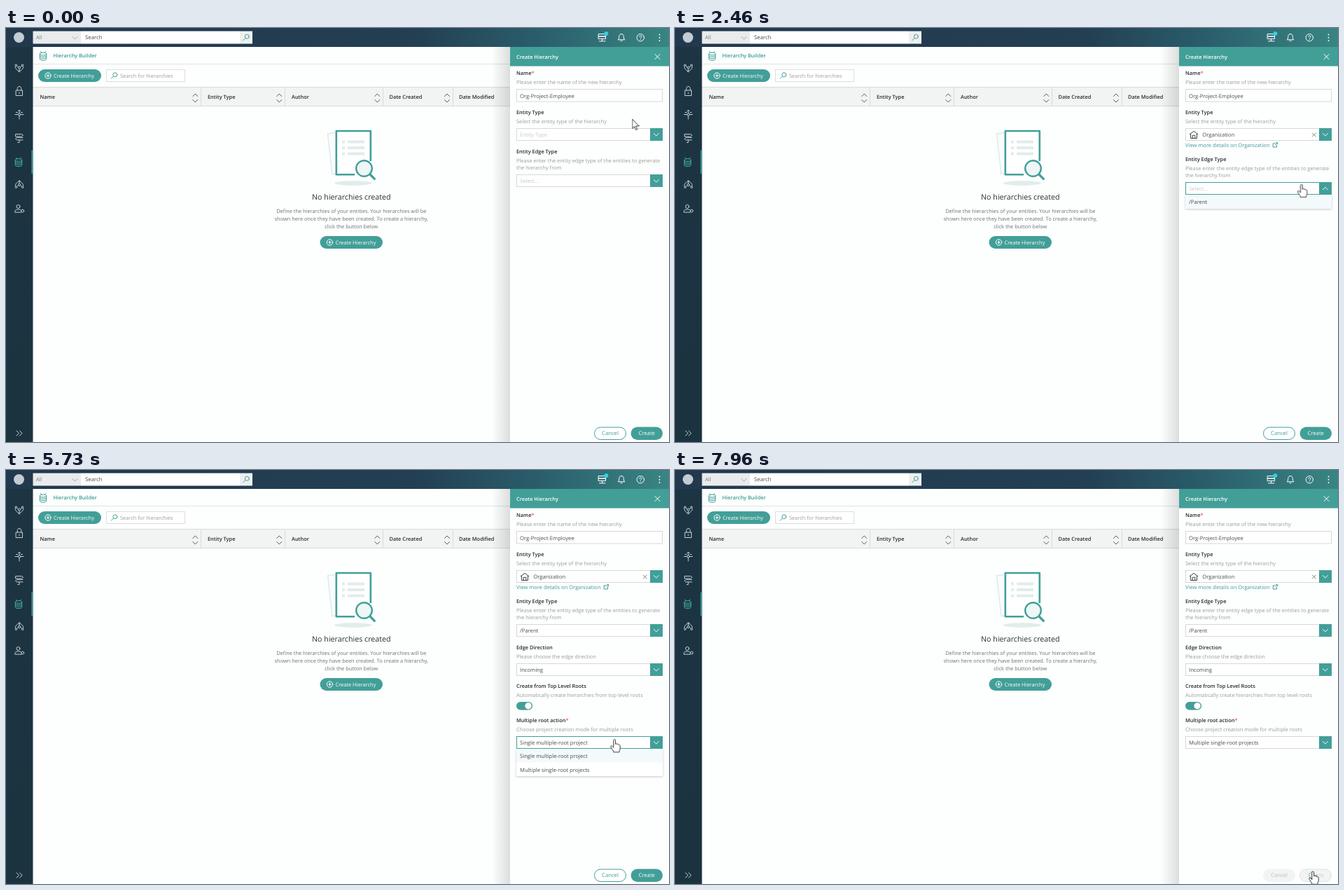
Animation, 947 px wide and 591 px high, one loop 8 s. Source, as an HTML page:

```html
<!DOCTYPE html>
<html lang="en">
<head>
<meta charset="utf-8">
<title>Create Hierarchy</title>
<style>
html, body { margin: 0; width: 100%; height: 100%; overflow: hidden; background: #fdfefe; }
svg { display: block; }
.stage { width: 100vw; height: 100vh; }
text { font: 7.45px "Open Sans", "Noto Sans", sans-serif; fill: #9a9c9c; text-rendering: geometricPrecision; }
.b { font-weight: 600; font-size: 7.4px; fill: #262b2b; }
.f { font-size: 7.65px; fill: #484c4c; }
.ph { fill: #c6c9c9; }
.s { font-size: 6.55px; fill: #8c9090; }
.red { fill: #e2555c; }
.teal { fill: #3f9c95; }
.w { fill: #fff; }
.mid { text-anchor: middle; }
.end { text-anchor: end; }
.ln { fill: none; stroke-width: 1; stroke-linecap: round; stroke-linejoin: round; }

/* One loop is 8 s: 1% = 80 ms */
.v { animation: 8s step-end infinite; }
@keyframes start { 0% { visibility: visible } 20.75%, to { visibility: hidden } }
@keyframes typeHover { 0% { visibility: hidden } 4.25% { visibility: visible } 20.75%, to { visibility: hidden } }
@keyframes typeOpen { 0% { visibility: hidden } 7.5% { visibility: visible } 20.75%, to { visibility: hidden } }
@keyframes chosen { 0% { visibility: hidden } 20.75%, to { visibility: visible } }
@keyframes edgeEmpty { 0% { visibility: hidden } 20.75% { visibility: visible } 40%, to { visibility: hidden } }
@keyframes edgeOpen { 0% { visibility: hidden } 29.125% { visibility: visible } 40%, to { visibility: hidden } }
@keyframes edgeSet { 0% { visibility: hidden } 40%, to { visibility: visible } }
@keyframes loading { 0% { visibility: hidden } 40% { visibility: visible } 42.5%, to { visibility: hidden } }
@keyframes roots { 0% { visibility: hidden } 42.5%, to { visibility: visible } }
@keyframes pick { 0% { visibility: hidden } 42.5% { visibility: visible } 61.25%, to { visibility: hidden } }
@keyframes action { 0% { visibility: hidden } 61.25%, to { visibility: visible } }
@keyframes single { 0% { visibility: hidden } 61.25% { visibility: visible } 82.875%, to { visibility: hidden } }
@keyframes multiple { 0% { visibility: hidden } 82.875%, to { visibility: visible } }
@keyframes actHover { 0% { visibility: hidden } 69% { visibility: visible } 82.875%, to { visibility: hidden } }
@keyframes actOpen { 0% { visibility: hidden } 71.625% { visibility: visible } 82.875%, to { visibility: hidden } }
@keyframes actFlip { 0% { visibility: hidden } 72% { visibility: visible } 82.875%, to { visibility: hidden } }
@keyframes busy { 0% { visibility: hidden } 40% { visibility: visible } 42.5% { visibility: hidden } 94.5%, to { visibility: visible } }
@keyframes arrow { 0% { visibility: visible } 4.25% { visibility: hidden } 51.625% { visibility: visible }
  57.5% { visibility: hidden } 62.6% { visibility: visible } 69% { visibility: hidden }
  83.75% { visibility: visible } 91.25%, to { visibility: hidden } }
@keyframes hand { 0% { visibility: hidden } 4.25% { visibility: visible } 51.625% { visibility: hidden }
  57.5% { visibility: visible } 62.6% { visibility: hidden } 69% { visibility: visible }
  83.75% { visibility: hidden } 91.25%, to { visibility: visible } }

.cursor { animation: move 8s ease-in-out infinite; }
@keyframes move {
  0%, 1.25% { transform: translate(894.5px, 130px) }
  5.375%, 8.75% { transform: translate(894.5px, 147.5px) }
  17%, 29.75% { transform: translate(894.5px, 222.5px) }
  38.25%, 54.5% { transform: translate(898px, 250px) }
  58.25%, 61.5% { transform: translate(748.5px, 335px) }
  70.375%, 72.5% { transform: translate(869px, 384.5px) }
  78.25%, 82.875% { transform: translate(872.5px, 424.5px) }
  92.5%, to { transform: translate(911px, 573px) }
}
.knob { animation: knob 8s linear infinite; }
@keyframes knob { 0%, 57.9% { transform: translateX(-11px) } 58.25%, to { transform: none } }
.lit { animation: lit 8s linear infinite; }
@keyframes lit { 0%, 61.3% { opacity: 0 } 62.5%, to { opacity: 1 } }
.spin { fill: none; stroke: #429f98; stroke-width: 1.1; stroke-dasharray: 14 1.5 1.5 1.5 1.5 1.5 1.5 20;
  transform-box: fill-box; transform-origin: center; animation: spin 1s linear infinite; }
@keyframes spin { to { transform: rotate(360deg) } }
</style>
</head>
<body>
<svg class="stage" viewBox="0 0 947 591">
<defs>
  <linearGradient id="bar">
    <stop offset="0" stop-color="#22384d"/><stop offset=".62" stop-color="#233f53"/>
    <stop offset=".8" stop-color="#2a5d6b"/><stop offset="1" stop-color="#398583"/>
  </linearGradient>
  <linearGradient id="side" x2="0" y2="1">
    <stop offset="0" stop-color="#1d3443"/><stop offset="1" stop-color="#1b333f"/>
  </linearGradient>
  <linearGradient id="shade"><stop offset="0" stop-opacity="0"/><stop offset="1" stop-opacity=".13"/></linearGradient>
  <filter id="drop" x="-5%" y="-10%" width="110%" height="130%">
    <feDropShadow dx="0" dy="1" stdDeviation="1.5" flood-opacity=".22"/>
  </filter>

  <g id="btn"><rect x="191" width="18" height="18" fill="#429f98"/></g>
  <g id="field">
    <rect x=".5" y=".5" width="208" height="17" fill="#fff" stroke="#d6d9d9"/>
    <use href="#btn"/><path d="M196.3 7.6l3.5 3.4 3.5-3.4" class="ln" stroke="#fff"/>
  </g>
  <rect id="focus" x=".5" y=".5" width="208" height="17" fill="none" stroke="#429f98"/>
  <g id="flip"><use href="#btn"/><path d="M196.3 10.8l3.5-3.4 3.5 3.4" class="ln" stroke="#fff"/></g>
  <path id="sort" d="M-3.5-2L0-5.5L3.5-2M-3.5 3L0 6.5L3.5 3" class="ln" stroke="#555a5a"/>
  <g id="plus" class="ln" stroke="#fff" stroke-width=".9"><circle r="4.2"/><path d="M-2 0h4M0-2v4"/></g>
  <g id="lens" class="ln"><circle cx="1.3" cy="-1.3" r="3"/><path d="M-1 1L-4.2 4.2"/></g>
  <g id="db" class="ln">
    <ellipse cy="-3" rx="4.7" ry="1.9"/><path d="M-4.7-3V4.2C-4.7 6.8 4.7 6.8 4.7 4.2V-3M-4.7-.6C-4.7 2 4.7 2 4.7-.6M-4.7 1.8C-4.7 4.4 4.7 4.4 4.7 1.8M-2.5-4.8L-3.5-6.5M2.5-4.8L3.5-6.5"/>
  </g>
  <g id="net" class="ln">
    <circle r="1.6"/><path d="M0-2.2V-4M-2 1L-3.6 2.3M2 1L3.6 2.3M-5.8 1.5C-5.5-1.5-4-3.2-2-4.2M5.8 1.5C5.5-1.5 4-3.2 2-4.2"/>
    <circle cy="-5.2" r="1.1"/><circle cx="-4.6" cy="3.4" r="1.2"/><circle cx="4.6" cy="3.4" r="1.2"/>
  </g>
  <g id="person" class="ln"><circle cy="-2.6" r="2.5"/><path d="M-4.8 5.2V4C-4.8 .6 4.8 .6 4.8 4V5.2Z"/></g>
  <g id="house" class="ln"><path d="M-5.8-.8L0-5.2L5.8-.8M-4.4-1V5H4.4V-1M-1.8 5V.8H1.8V5"/></g>

  <g id="edgeHead">
    <text class="b" x="729" y="178.6">Entity Edge Type</text>
    <text x="729" y="191.5">Please enter the entity edge type of the entities to generate</text>
    <text x="729" y="202.4">the hierarchy from</text>
    <use href="#field" x="729" y="209"/>
  </g>
  <g id="hier">
    <text class="b" x="729" y="311">Hierarchies from Edge Type</text>
    <text x="729" y="324">Choose one or more top level entities found to create</text>
    <text x="729" y="334.8">hierarchy/hierarchies</text>
    <use href="#field" x="729" y="342"/>
    <text class="f ph" x="734" y="353.8">Select...</text>
    <text class="s red" x="729" y="368.4">Please choose at least one entity</text>
  </g>
</defs>

<rect width="947" height="591" fill="#fdfefe"/>

<!-- Page title and tools -->
<path d="M38 51.5H720" stroke="#e2e5e5"/>
<use href="#db" x="53" y="40" stroke="#429f98"/>
<text class="b teal" x="67.5" y="42">Hierarchy Builder</text>
<rect x="46" y="59" width="90" height="18" rx="9" fill="#429f98"/>
<use href="#plus" x="60" y="68"/>
<text class="w" x="68" y="70.7">Create Hierarchy</text>
<rect x="143.5" y="59.5" width="112" height="17" fill="#fff" stroke="#dcdfdf"/>
<use href="#lens" x="154.5" y="68" stroke="#429f98"/>
<text x="163" y="70.7">Search for hierarchies</text>

<!-- Table head -->
<rect x="38" y="84" width="682" height="27" fill="#f2f3f3"/>
<path d="M38 84.5H720M38 111.5H720M278.5 84v27M398.5 84v27M538.5 84v27M638.5 84v27" stroke="#d9dcdc"/>
<text class="b" x="48.5" y="100.8">Name</text>
<text class="b" x="288" y="100.8">Entity Type</text>
<text class="b" x="408" y="100.8">Author</text>
<text class="b" x="547.5" y="100.8">Date Created</text>
<text class="b" x="647" y="100.8">Date Modified</text>
<use href="#sort" x="270.3" y="99.5"/><use href="#sort" x="390.3" y="99.5"/>
<use href="#sort" x="530.3" y="99.5"/><use href="#sort" x="630" y="99.5"/>

<!-- Empty state -->
<ellipse cx="496" cy="221.5" rx="27" ry="3.2" fill="#e1eceb"/>
<path d="M470 149.5L459.5 151L466 208.5L471 208" fill="#fafcfc" stroke="#dfeae9" stroke-width="1.5"/>
<path d="M498 209.3H471.8V147H520.8V190" fill="#fff" stroke="#429f98" stroke-width="2.6" stroke-linejoin="round"/>
<path d="M488 162.5h24M488 171h24M488 179.5h24" stroke="#e1eceb" stroke-width="4"/>
<path d="M480 162.5h4M480 171h4M480 179.5h4" stroke="#e1eceb" stroke-width="4"/>
<circle cx="511.5" cy="200.5" r="11.3" fill="#eef6f6" stroke="#429f98" stroke-width="2.4"/>
<path d="M519.5 208.5L527.3 216.3" stroke="#429f98" stroke-width="3.2"/>
<text class="mid" x="493.3" y="245.2" style="font-size:10.7px;fill:#2b3030">No hierarchies created</text>
<g class="mid">
  <text x="493.3" y="264.2" style="fill:#6d7272">Define the hierarchies of your entities. Your hierarchies will be</text>
  <text x="493.3" y="274.8" style="fill:#6d7272">shown here once they have been created. To create a hierarchy,</text>
  <text x="493.3" y="285.5" style="fill:#6d7272">click the button below</text>
</g>
<rect x="448.5" y="297" width="89.500" height="18" rx="9" fill="#429f98"/>
<use href="#plus" x="462.500" y="306"/>
<text class="w" x="470.5" y="308.7">Create Hierarchy</text>

<!-- Top bar -->
<rect width="947" height="27" fill="url(#bar)"/>
<circle cx="18.500" cy="13.500" r="7.500" fill="#c3ccd2"/>
<rect x="38.500" y="4.500" width="68.500" height="18" fill="#e9ebec"/>
<rect x="107" y="4.500" width="227" height="18" fill="#fff"/>
<rect x="334" y="4.500" width="18" height="18" fill="#eef0f0"/>
<text x="43" y="16.200" style="fill:#777c7c">All</text>
<path d="M95 12.500l3.500 3.500 3.500-3.500" class="ln" stroke="#a0a5a5"/>
<text class="f" x="113" y="16.300" style="font-size:7.8px">Search</text>
<use href="#lens" x="343" y="13.500" stroke="#429f98"/>
<g class="ln" stroke="#fff">
  <path d="M846.500 8.500h10v3.500h-10zM846.500 12h10v3.500h-10zM851.500 15.500v3M847.500 18.800h8.500"/>
  <path d="M874.500 16.500C876 15 875.500 13 875.800 11.500C876.300 7.500 881.700 7.500 882.200 11.500C882.500 13 882 15 883.500 16.500ZM877.700 18.200C878.500 19.200 879.500 19.200 880.300 18.200"/>
  <circle cx="906.300" cy="13.700" r="5.200"/>
  <path d="M904.700 12.400C904.700 10.400 908 10.400 908 12.400C908 13.600 906.300 13.500 906.300 14.900M906.300 16.500v.1"/>
</g>
<circle cx="857.300" cy="8" r="3" fill="#35d0e0"/>
<path d="M933.500 9.500v.1M933.500 13.700v.1M933.500 17.900v.1" stroke="#fff" stroke-width="1.900" stroke-linecap="round"/>

<!-- Sidebar -->
<rect y="27" width="38.500" height="564" fill="url(#side)"/>
<rect x="36.500" y="174.500" width="2" height="33.500" fill="#429f98"/>
<g class="ln" stroke="#c5d0d4">
  <use href="#net" transform="translate(19 56.500) rotate(180)"/>
  <path d="M14.500 89h9v7.500h-9zM16.200 89v-2.500C16.200 82.500 21.800 82.500 21.800 86.500V89M19 92v1.800"/>
  <circle cx="19" cy="123.500" r="1.700"/>
  <path d="M19 121.500v-4M19 125.500v4.500M17 123.500h-4M21 123.500h4M17.500 118.500l1.500-1.500 1.500 1.500M14.500 120.500h2M21.500 120.500h2"/>
  <path d="M14 151.500h8.500l2 1.700-2 1.700H14zM24 156.500h-8.500l-2 1.700 2 1.700H24M19 160v3.500h-2"/>
  <use href="#net" x="19" y="224"/>
  <use href="#person" x="17.500" y="257.500"/>
  <circle cx="23.800" cy="261" r="1.900" fill="#1c3340"/>
  <path d="M15 575l3.700 3.500-3.700 3.500M19.500 575l3.700 3.500-3.700 3.500"/>
</g>
<use href="#db" x="18" y="191.500" stroke="#45b0a8"/>

<!-- Side panel -->
<rect x="694" y="27" width="26" height="564" fill="url(#shade)"/>
<rect x="720" y="27" width="227" height="564" fill="#fdfefe"/>
<rect x="720" y="27" width="227" height="27.500" fill="#429f98"/>
<text class="b w" x="729" y="44.200">Create Hierarchy</text>
<path d="M927 37.500l7 7M934 37.500l-7 7" class="ln" stroke="#fff"/>
<text class="b" x="729" y="67.300">Name<tspan class="red">*</tspan></text>
<text x="729" y="80.400">Please enter the name of the new hierarchy</text>
<rect x="729.500" y="87.500" width="208" height="17.500" fill="#fff" stroke="#d6d9d9"/>
<text class="f" x="734" y="99.700">Org-Project-Employee</text>
<text class="b" x="729" y="122.700">Entity Type</text>
<text x="729" y="136">Select the entity type of the hierarchy</text>
<use href="#field" x="729" y="143"/>

<g class="v" style="animation-name:start">
  <text class="f ph" x="734" y="155.200">Entity Type</text>
  <use href="#edgeHead"/>
  <text class="f ph" x="734" y="221">Select...</text>
</g>
<use class="v" style="animation-name:typeHover" href="#focus" x="729" y="143"/>

<g class="v" style="animation-name:chosen">
  <use href="#house" x="741" y="152.500" stroke="#3a3f3f"/>
  <text class="f" x="753.300" y="155.200">Organization</text>
  <path d="M910.300 150l5 5M915.300 150l-5 5" class="ln" stroke="#7c8181"/>
  <text class="teal" x="729" y="169.700" style="font-size:7.55px">View more details on Organization</text>
  <path d="M857 164.800h-2.800v5.200h5.300v-2.800M857.500 166.700l3-3M858.500 163.700h2v2" class="ln" stroke="#429f98" stroke-width=".9"/>
  <use href="#edgeHead" y="11"/>
</g>
<g class="v" style="animation-name:edgeEmpty">
  <text class="f ph" x="734" y="232">Select...</text>
  <use href="#focus" x="729" y="220"/>
</g>

<g class="v" style="animation-name:edgeSet">
  <text class="f" x="734" y="232.400">/Parent</text>
  <text class="b" x="729" y="255.700">Edge Direction</text>
  <text x="729" y="268.700">Please choose the edge direction</text>
  <use href="#field" x="729" y="276"/>
  <text class="f" x="734" y="288">Incoming</text>
</g>

<g class="v" style="animation-name:loading">
  <use href="#hier"/>
  <circle class="spin" cx="910" cy="351" r="4.500"/>
</g>

<g class="v" style="animation-name:roots">
  <text class="b" x="729" y="311">Create from Top Level Roots</text>
  <text x="729" y="324">Automatically create hierarchies from top level roots</text>
  <rect x="729" y="331" width="23" height="11.500" rx="5.750" fill="#c9cccc"/>
  <rect class="lit" x="729" y="331" width="23" height="11.500" rx="5.750" fill="#429f98"/>
  <circle class="knob" cx="746" cy="336.750" r="4.700" fill="#fff"/>
</g>
<use class="v" style="animation-name:pick" href="#hier" y="49"/>

<g class="v" style="animation-name:action">
  <text class="b" x="729" y="359.700">Multiple root action<tspan class="red">*</tspan></text>
  <text x="729" y="372.900">Choose project creation mode for multiple roots</text>
  <use href="#field" x="729" y="380"/>
</g>
<text class="f v" style="animation-name:single" x="734" y="392.200">Single multiple-root project</text>
<text class="f v" style="animation-name:multiple" x="734" y="392.200">Multiple single-root projects</text>
<use class="v" style="animation-name:actHover" href="#focus" x="729" y="380"/>
<use class="v" style="animation-name:actFlip" href="#flip" x="729" y="380"/>

<!-- Drop-down lists -->
<g class="v" style="animation-name:typeOpen">
  <rect x="729" y="161" width="209" height="146" fill="#fff" filter="url(#drop)"/>
  <use href="#flip" x="729" y="143"/>
  <use href="#focus" x="729" y="143"/>
  <path d="M734.500 147v11" stroke="#333"/>
  <text class="s" x="733.500" y="173" style="font-size:6.7px">Showing 4 of 4</text>
  <rect x="884" y="165.500" width="23" height="11.500" rx="5.750" fill="#429f98"/>
  <circle cx="901" cy="171.250" r="4.700" fill="#fff"/>
  <text class="f" x="911" y="174">Used</text>
  <g class="ln" stroke="#3a3f3f">
    <use href="#person" x="738.500" y="196"/><path d="M742.500 199.500h4M744.500 197.500v4"/>
    <use href="#house" x="739.500" y="228"/>
    <path d="M737 255h8M737 258h8M737 261h8M737 264h8M734 255h.5M734 258h.5M734 261h.5M734 264h.5"/>
    <use href="#person" x="739.500" y="291"/>
  </g>
  <text class="f" x="750" y="193.200">Employee</text><text class="s" x="750" y="205.700">/Employee</text>
  <text class="f" x="750" y="225.100">Organization</text><text class="s" x="750" y="237.500">/Organization</text>
  <text class="f" x="750" y="256.900">Project</text><text class="s" x="750" y="269.300">/Project</text>
  <text class="f" x="750" y="288.700">User</text><text class="s" x="750" y="301">/Infrastructure/User</text>
  <g class="end">
    <text class="f" x="927.500" y="193.200">20</text><text class="f" x="927.500" y="225.100">6</text>
    <text class="f" x="927.500" y="256.900">20</text><text class="f" x="927.500" y="288.700">1</text>
  </g>
</g>

<g class="v" style="animation-name:edgeOpen">
  <rect x="729" y="238" width="209" height="20" fill="#fff" filter="url(#drop)"/>
  <rect x="729" y="239" width="209" height="18.500" fill="#f4f9fb"/>
  <use href="#flip" x="729" y="220"/>
  <use href="#focus" x="729" y="220"/>
  <text class="f" x="734" y="251">/Parent</text>
</g>

<g class="v" style="animation-name:actOpen">
  <rect x="729" y="398" width="209" height="39" fill="#fff" filter="url(#drop)"/>
  <rect x="729" y="398.500" width="209" height="19" fill="#f4f9fb"/>
  <use href="#focus" x="729" y="380"/>
  <text class="f" x="734" y="411">Single multiple-root project</text>
  <text class="f" x="734" y="430.700">Multiple single-root projects</text>
</g>

<!-- Footer buttons -->
<rect x="840.500" y="570" width="45" height="17.500" rx="8.750" fill="#fff" stroke="#429f98"/>
<text class="mid teal" x="863" y="581.300" style="font-size:7.7px">Cancel</text>
<rect x="892.500" y="569.500" width="45.500" height="18.500" rx="9.250" fill="#429f98"/>
<text class="mid w" x="915.200" y="581.300" style="font-size:7.7px">Create</text>
<g class="v" style="animation-name:busy">
  <rect x="838" y="567" width="103" height="23" fill="#fdfefe"/>
  <rect x="840" y="569.500" width="46" height="18.500" rx="9.250" fill="#f2f3f3"/>
  <text class="mid" x="863" y="581.300" style="font-size:7.7px;fill:#bdc0c0">Cancel</text>
  <rect x="892.500" y="570" width="45" height="17.500" rx="8.750" fill="#f2f3f3" stroke="#dfe2e2"/>
  <text class="mid" x="915.200" y="581.300" style="font-size:7.7px;fill:#cfd2d2">Create</text>
  <circle class="spin" cx="911" cy="578.500" r="5"/>
</g>

<!-- Pointer -->
<g class="cursor" fill="#fff" stroke="#222" stroke-width=".9" stroke-linejoin="round">
  <path class="v" style="animation-name:arrow" d="M0 0V13.500L3.200 10.600L5.300 15.600L7.300 14.700L5.200 9.900H9.500Z"/>
  <path class="v" style="animation-name:hand" d="M-1.200 1.200C-1.200-.1 1.600-.1 1.600 1.200V6.800C2 5.900 4 6 4 7.200C4.600 6.500 6.200 6.800 6.200 8C7 7.400 8.200 8 8.200 9.300V12.500C8.200 15 7 15.500 7 18.200H-1.200C-1.200 16-4 13.500-5.200 10.800C-5.900 9.300-4 8.600-2.900 9.900L-1.200 11.700Z"/>
</g>
</svg>
</body>
</html>
```
